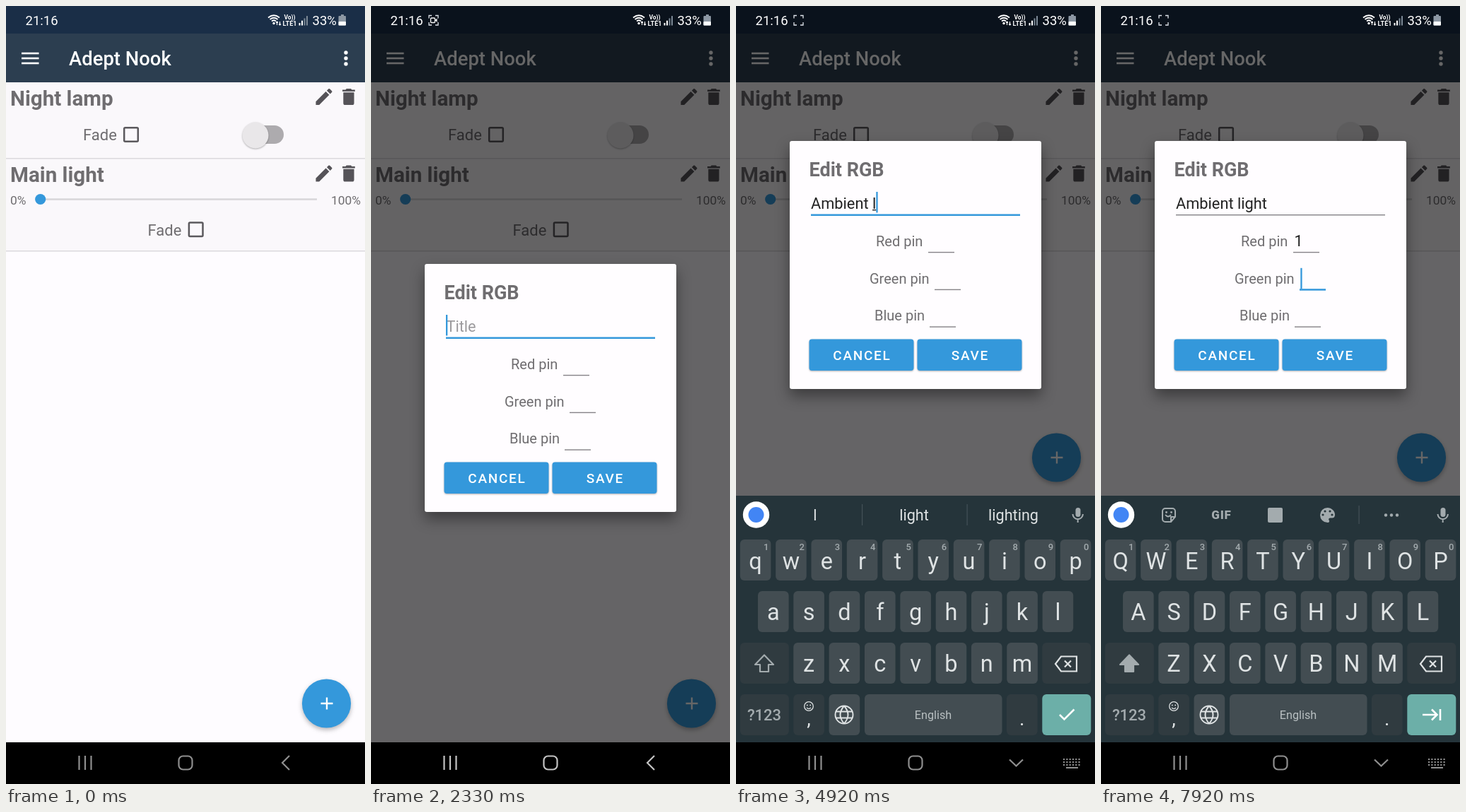
Recreate the animation shown at these times as an HTML page. Size 508x1101 px, loop 8000 ms.

```html
<!DOCTYPE html>
<html lang="en">
<head>
<meta charset="utf-8">
<title>Room control</title>
<style>
  html, body { margin: 0; width: 100%; height: 100%; overflow: hidden; background: #000; }
  svg { display: block; width: 100vw; height: 100vh; }
  text { font-family: Roboto, "Noto Sans", sans-serif; white-space: pre; }
  .shadow { filter: drop-shadow(0 3px 3px rgba(0, 0, 0, .28)); }
  .low { filter: drop-shadow(0 1.5px 1.2px rgba(0, 0, 0, .3)); }
  .deep { filter: drop-shadow(0 10px 10px rgba(0, 0, 0, .4)); }
</style>
</head>
<body>
<svg id="stage" viewBox="0 0 508 1101" preserveAspectRatio="none"></svg>
<script>
const LOOP = 8000, BLUE = '#3498db', GREY = '#6f6d70', KEY = '#434d52', DARK_KEY = '#303b40';
const INK = '#dfe3e4', SOFT = '#a3abae';
const $ = id => document.getElementById(id);

const rect = (x, y, w, h, fill, r = 0, more = '') =>
  `<rect x="${x}" y="${y}" width="${w}" height="${h}" rx="${r}" fill="${fill}" ${more}/>`;
const circle = (x, y, r, fill, more = '') => `<circle cx="${x}" cy="${y}" r="${r}" fill="${fill}" ${more}/>`;
const line = (d, color, w = 2, more = '') =>
  `<path d="${d}" fill="none" stroke="${color}" stroke-width="${w}" ${more}/>`;
const text = (s, x, y, size, fill, more = '') =>
  `<text x="${x}" y="${y}" font-size="${size}" fill="${fill}" ${more}>${s}</text>`;
const group = (id, body, more = '') => `<g id="${id}" ${more}>${body}</g>`;
const MID = 'text-anchor="middle"', END = 'text-anchor="end"', BOLD = 'font-weight="700"', MEDIUM = 'font-weight="500"';

// ---- page behind the dialog
const pencil = y => `<path transform="translate(434.6 ${y - 15.4}) scale(1.28)" fill="#555358"
  d="M3 17.25V21h3.75L17.8 9.94l-3.75-3.75zM20.7 7.04a1 1 0 0 0 0-1.41l-2.33-2.33a1 1 0 0 0-1.41 0l-1.83 1.83 3.75 3.75z"/>`;
const trash = y => `<path transform="translate(469.7 ${y - 15.2}) scale(1.27)" fill="#555358"
  d="M6 19a2 2 0 0 0 2 2h8a2 2 0 0 0 2-2V7H6zM19 4h-3.5l-1-1h-5l-1 1H5v2h14z"/>`;
const checkbox = (x, y) => rect(x - 9.8, y - 9.8, 19.6, 19.6, 'none', 1.5, 'stroke="#5b595d" stroke-width="2.5"');
const card = (name, y) => text(name, 6, y + 11.5, 29.6, GREY, BOLD) + pencil(y - .5) + trash(y - .5);

function page() {
  return rect(0, 0, 508, 1101, '#fefcff') + rect(0, 108, 508, 239, '#faf8fb')
    + rect(0, 0, 508, 39, '#1a2e47') + rect(0, 39, 508, 69, '#2c3e50')
    + [67, 74, 81].map(y => rect(22, y - 1.3, 24.5, 2.6, '#fff')).join('')
    + text('Adept Nook', 89, 84, 27.4, '#fff', MEDIUM)
    + [66, 74, 82].map(y => circle(481, y, 2.7, '#fff')).join('')
    + card('Night lamp', 129) + text('Fade', 109, 190, 22, GREY) + checkbox(177, 182)
    + rect(340, 169, 53, 26, '#adabae', 13) + circle(353, 183, 18.5, '#e9e7e9', 'class="low"')
    + rect(0, 215, 508, 1.5, '#dcdadd')
    + card('Main light', 237.5) + text('0%', 6, 281, 17.4, GREY) + text('100%', 502, 281, 17.4, GREY, END)
    + rect(49, 272.3, 391, 2.5, '#d8d6d9') + circle(48.7, 273.5, 7.6, BLUE)
    + text('Fade', 200.5, 324.5, 22, GREY) + checkbox(268.7, 316.3)
    + rect(0, 346, 508, 1.5, '#dcdadd');
}

const WHITE = 'stroke-linecap="round"';
const ITEMS = [
  ['Switch', 788, line('M434 788h4M446 786l9-6M459 788h4', '#fff', 2.3)
    + circle(441, 788, 3.2, 'none', 'stroke="#fff" stroke-width="2.3"') + circle(456.5, 788, 3.2, 'none', 'stroke="#fff" stroke-width="2.3"')],
  ['Slider', 849.5, line('M436 849.5h25', '#fff', 2.3) + circle(448.5, 849.5, 4, '#fff')],
  ['RGB', 911, '<path d="M442.5 917v-7a6 6 0 0 1 12 0v7h1.5v3h-15v-3z" fill="#fff"/>'
    + line('M445.5 919v6M451.5 919v6M448.5 896v5M438 900l3.5 3.5M459 900l-3.5 3.5M435 910h4M458 910h4', '#fff', 2.2)]
];
const menu = () => ITEMS.map(([name, y, icon], i) => group('item' + i,
  text(name, 409, y + 7, 19, GREY, BOLD + END)
  + circle(448.5, y, 24.7, BLUE, `id="disc${i}" class="shadow"`) + icon)).join('');

const fab = () => circle(453.5, 987, 34.6, BLUE, 'class="shadow"') + line('M445.5 987h17M454 978.5v17', '#fff', 2.4);

// ---- dialog
const PINS = [['Red', 198, 272, 522.5], ['Green', 189, 281, 575.3], ['Blue', 196, 274, 628]];
const button = (s, x, mid) => rect(x, 645.5, 148, 44.5, BLUE, 4, 'class="low"')
  + text(s, mid + .9, 675, 19, '#fff', MEDIUM + MID + ' letter-spacing="1.7"');

function dialog() {
  return rect(76, 365, 356, 351, '#fffdff', 3, 'class="deep"')
    + text('Edit RGB', 103.5, 414.5, 27, GREY, BOLD)
    + text('Title', 106.5, 460.5, 21.7, '#9c9a9d', 'id="hint"')
    + text('', 106, 460.5, 21.8, '#222', 'id="title"')
    + rect(0, 462, 0, 1.4, '#222', 0, 'id="compose"')
    + rect(106, 469, 296, 1.4, '#888', 0, 'id="rule"')
    + PINS.map(([name, x, fx, y], i) => text(name + ' pin', x, y - 8.7, 20, GREY)
      + rect(fx, y - .6, 37, 1.4, '#888', 0, `id="rule${i}"`)).join('')
    + text('', 273.5, 514.3, 21.5, '#222', 'id="pin"')
    + rect(0, 0, 2.3, 29.5, BLUE, 0, 'id="caret"')
    + button('CANCEL', 103.5, 177.5) + button('SAVE', 256.5, 330.5);
}

// ---- keyboard
const PITCH = 50.33;
const ROWS = [['qwertyuiop', 5.8, 755, 797], ['asdfghjkl', 31, 828, 868.5], ['zxcvbnm', 81.3, 901, 941.5]];
const cap = (x, y, w, fill, more = '') => rect(x, y, w, 58, fill, 6, more);

function letters() {
  return ROWS.map(([chars, x0, y, base], row) => [...chars].map((c, i) => {
    const x = x0 + i * PITCH;
    return cap(x, y, 43.6, KEY, `id="cap-${c}"`) + text(c, x + 21.8, base, 32.5, INK, `${MID} class="letter"`)
      + (row ? '' : text((i + 1) % 10, x + 37, 770, 13, SOFT, MID + MEDIUM));
  }).join('')).join('');
}

function toolbar() {
  return line('M91 711h10a4 4 0 0 1 4 4v8l-6 7h-8a4 4 0 0 1-4-4v-11a4 4 0 0 1 4-4zM99 729v-6h6M91 720q4 5 8 0', SOFT, 2)
    + circle(92.5, 716.5, 1.4, SOFT) + circle(99.5, 716.5, 1.4, SOFT)
    + text('GIF', 170.5, 726, 17, SOFT, `${MID} font-weight="900" letter-spacing=".8"`)
    + rect(236, 710, 21, 21, SOFT, 2)
    + `<path fill="${SOFT}" d="M320.5 710a10.5 10.5 0 0 0 0 21c3 0 3-2 2-3.500s0-3 2-3h3c3 0 3.500-3 3.500-5 0-5-5-9.500-10.500-9.500z"/>`
    + [[314, 720], [317, 715], [324, 715], [327, 720]].map(p => circle(...p, 1.6, '#26343a')).join('')
    + rect(364.500, 707, 1.2, 26, '#445157') + [403, 411, 419].map(x => circle(x, 720.5, 2.2, SOFT)).join('');
}

function keyboard() {
  return rect(0, 693, 508, 409, '#25343a')
    + circle(28.500, 720, 18.7, '#fff') + circle(28.500, 720, 11, '#4285f4')
    + group('tools', toolbar())
    + group('words', [112, 252, 392.500].map((x, i) => text('', x, 728, 21.6, INK, `${MID} id="word${i}"`)).join('')
      + rect(178, 705, 1.2, 30, '#445157') + rect(326.500, 705, 1.2, 30, '#445157'))
    + rect(480.500, 710, 7, 13, SOFT, 3.500) + line('M476.500 719a7.200 7.200 0 0 0 14.400 0M483.700 726v5', SOFT, 2)
    + letters()
    + cap(5.800, 901, 69, DARK_KEY, 'id="cap-shift"')
    + line('M40 918.500L27 932h7v10h12v-10h7z', SOFT, 2.2, 'id="shift" stroke-linejoin="round"')
    + cap(433.300, 901, 69, DARK_KEY)
    + line('M460 920.500h22v21h-22l-8-10.500zM465 926.500l9 9M474 926.500l-9 9', INK, 2.2)
    + cap(5.800, 974, 69, DARK_KEY) + text('?123', 40, 1010.500, 22, SOFT, MID + MEDIUM)
    + cap(81.300, 974, 43.600, DARK_KEY) + circle(103, 991, 6.300, 'none', `stroke="${INK}" stroke-width="1.3"`)
    + circle(100.800, 989.500, .9, INK) + circle(105.200, 989.500, .9, INK) + line('M100 993q3 3 6 0', INK, 1.2)
    + text(',', 103, 1018, 28, INK, MID)
    + cap(131.600, 974, 43.600, KEY)
    + line('M140.500 1003a12.500 12.500 0 0 1 25 0a12.500 12.500 0 0 1-25 0M142 998.500h22M142 1007.500h22M153 990.500q-11 12.500 0 25M153 990.500q11 12.500 0 25', INK, 1.9)
    + cap(182, 974, 194.500, KEY, 'id="cap-space"') + text('English', 279, 1008.500, 16.200, '#b9c0c2', MID)
    + cap(383, 974, 43.600, DARK_KEY) + text('.', 404.800, 1018, 28, INK, MID)
    + cap(433.300, 974, 69, '#6cafa8', 'id="cap-enter"')
    + line('M458 1003l6.500 6.500 14-14', '#fff', 2.600, 'id="tick"')
    + line('M455 1003h20M468 995.500l7.500 7.500-7.500 7.500M480 995v16', '#fff', 2.600, 'id="tab"')
    + group('popup', rect(6, 692, 44, 58, '#56636a', 6) + text('1', 28, 732, 32, '#fff', MID));
}

// ---- system bars
function statusBar() {
  const arc = r => `M${379 - r} ${24.500 - r}q${r} ${-r * .8} ${2 * r} 0`;
  return text('21:16', 27.500, 27, 18.500, '#fff')
    + group('frame', line('M82 17.500v-4h4M91 13.500h4v4M95 23v4h-4M86 27h-4v-4', '#dfe4ea', 1.300))
    + group('camera', rect(84.500, 17, 6, 6.500, 'none', 1, 'stroke="#fff" stroke-width="1.300"') + '<path d="M90.500 20l3-2.500v5.500z" fill="#fff"/>')
    + line([8, 5.500, 3].map(arc).join(''), '#fff', 1.800) + circle(379, 24.500, 1.700, '#fff')
    + line('M383.500 27v-5m-1.500 1.500l1.500-1.500 1.500 1.500M387.500 22v5m-1.500-1.500l1.500 1.500 1.500-1.500', '#fff', 1.100)
    + text('Vo))', 401.500, 18.500, 8.500, '#fff', MID + BOLD) + text('LTE1', 401.500, 27.500, 9, '#fff', MID + BOLD)
    + [0, 1, 2, 3].map(i => rect(414.500 + i * 3.500, 24 - i * 3.300, 2, 3.500 + i * 3.300, i < 2 ? '#fff' : '#7c8996')).join('')
    + text('33%', 433.500, 27, 18.500, '#fff')
    + rect(474, 12, 4, 2, '#8c97a3') + rect(470.500, 14, 10.500, 13.500, '#8c97a3', 1) + rect(470.500, 22, 10.500, 5.500, '#fff', 1);
}

function navBar() {
  const dots = [0, 1, 2].map(r => [0, 1, 2, 3, 4, 5].map(c => rect(463 + c * 4.300, 1065 + r * 4, 2.200, 2, '#8f8f8f')).join('')).join('');
  return rect(0, 1042, 508, 59, '#000')
    + group('nav', '<path d="M103.500 1061v20M112 1061v20M120.500 1061v20"/><rect x="244.500" y="1061.500" width="19" height="19" rx="6"/>'
      + '<path id="back" d="M401 1061l-10 10 10 10"/>', 'fill="none" stroke="#8f8f8f" stroke-width="2.200"')
    + group('dots', dots + rect(467, 1077, 17, 2, '#8f8f8f'));
}

$('stage').innerHTML = page() + group('menu', menu()) + group('fab', fab())
  + rect(0, 0, 508, 1101, '#000', 0, 'id="dim"') + group('dialog', dialog())
  + group('keyboard', keyboard()) + navBar() + statusBar();

// ---- timeline
const PHRASE = 'Ambient light';
const TYPED = [3420, 3590, 3920, 4080, 4250, 4420, 4580, 4830, 4900, 5080, 5250, 5420, 5580];
const SHIFT = 3170, RED = 6250, DIGIT = 7330, GREEN = 7830;
const EVENTS = [2250, ...TYPED, RED, DIGIT, GREEN];
const capOf = c => c === ' ' ? 'space' : c.toLowerCase();

const set = (id, attrs) => { for (const k in attrs) $(id).setAttribute(k, attrs[k]); };
const show = (id, on) => set(id, { visibility: on ? 'visible' : 'hidden' });
const ramp = (t, a, b) => Math.min(1, Math.max(0, (t - a) / (b - a)));
const ease = (t, a, b) => 1 - (1 - ramp(t, a, b)) ** 3;
const scaleAt = (x, y, s) => `translate(${x} ${y}) scale(${s}) translate(${-x} ${-y})`;

function drawMenu(t) {
  const out = 1 - ramp(t, 1740, 1880);
  ITEMS.forEach(([, y], i) => {
    const start = 670 + (2 - i) * 60, k = ease(t, start, start + 210) * out;
    set('item' + i, { opacity: k, transform: scaleAt(448.500, y, .3 + .7 * k) });
  });
  set('disc2', { fill: t >= 1500 && t < 1740 ? '#2474a8' : BLUE });
}

function suggest(typed) {
  const word = typed.slice(typed.lastIndexOf(' ') + 1);
  const list = !word ? ['and', 'light', 'music']
    : typed.includes(' ') ? [word, 'light', 'lighting'] : [word, 'Ambient', 'Ambience'];
  list.forEach((s, i) => { $('word' + i).textContent = s; });
  return word;
}

function drawFields(t) {
  const typed = PHRASE.slice(0, TYPED.filter(x => x <= t).length);
  const field = t < RED ? -1 : t < GREEN ? 0 : 1;
  const title = $('title');
  title.textContent = typed;
  show('hint', !typed);
  const width = typed ? title.getComputedTextLength() : 0;
  const writing = typed && field < 0;
  show('tools', !writing);
  show('words', writing);
  show('compose', writing);
  if (writing) {
    const word = suggest(typed);
    const from = word ? title.getSubStringLength(0, typed.length - word.length || 1) : width;
    const left = typed.length > word.length ? from : 0;
    set('compose', { x: 106 + left, width: width - left });
  }
  const rule = (id, y, on) => set(id, { y: on ? y - .5 : y, height: on ? 2.500 : 1.400, fill: on ? BLUE : '#858387' });
  rule('rule', 469, field < 0);
  PINS.forEach((p, i) => rule('rule' + i, p[3] - .6, field === i));
  $('pin').textContent = t >= DIGIT ? '1' : '';

  const last = EVENTS.filter(x => x <= t).pop() || 0;
  const digit = field === 0 && t >= DIGIT ? 12 : 0;
  set('caret', field < 0 ? { x: 106 + width, y: 437 } : { x: PINS[field][2] + 1.300 + digit, y: PINS[field][3] - 30.500 });
  show('caret', (t - last) % 1000 < 500);
}

function drawKeys(t) {
  const upper = (t >= SHIFT && t < TYPED[0]) || t >= RED;
  document.querySelectorAll('.letter').forEach(el => {
    const c = el.textContent;
    el.textContent = upper ? c.toUpperCase() : c.toLowerCase();
  });
  set('shift', { fill: upper ? SOFT : 'none' });
  const pressed = (at, hold = 70) => t >= at - hold && t < at;
  new Set(PHRASE.toLowerCase()).forEach(c => {
    const down = TYPED.some((at, i) => capOf(PHRASE[i]) === capOf(c) && pressed(at));
    set('cap-' + capOf(c), { fill: down ? '#5b666b' : KEY });
  });
  set('cap-q', { fill: pressed(DIGIT, 410) ? '#5b666b' : KEY });
  set('cap-shift', { fill: pressed(SHIFT + 80) ? '#46525a' : DARK_KEY });
  set('cap-enter', { fill: pressed(RED) || pressed(GREEN) ? '#88c3bc' : '#6cafa8' });
  show('tick', t < RED);
  show('tab', t >= RED);
  show('popup', t >= 7000 && t < DIGIT);
}

function draw(t) {
  const open = ramp(t, 1830, 2000), up = ease(t, 2500, 2750), typing = up > 0;
  drawMenu(t);
  set('fab', { transform: `translate(0 ${-348 * up})` });
  set('dim', { opacity: .6 * open });
  set('dialog', { opacity: open, transform: `translate(0 ${-174 * up}) ${scaleAt(254, 540, .92 + .08 * open)}` });
  set('keyboard', { transform: `translate(0 ${349 * (1 - up)})` });
  drawFields(t);
  drawKeys(t);
  show('keyboard', typing);
  if (!typing) ['tools', 'words', 'tick', 'tab', 'popup'].forEach(id => show(id, false));
  set('nav', { stroke: t >= 1900 && !typing ? '#c4c4c4' : '#8f8f8f' });
  set('back', { d: typing ? 'M387 1066.500l9.500 9 9.500-9' : 'M401 1061l-10 10 10 10' });
  show('dots', typing);
  const blink = t % 1500;
  show('frame', blink >= 80);
  show('camera', blink >= 750 && blink < 1200);
}

function tick() {
  draw(performance.now() % LOOP);
  requestAnimationFrame(tick);
}
tick();
</script>
</body>
</html>
```
